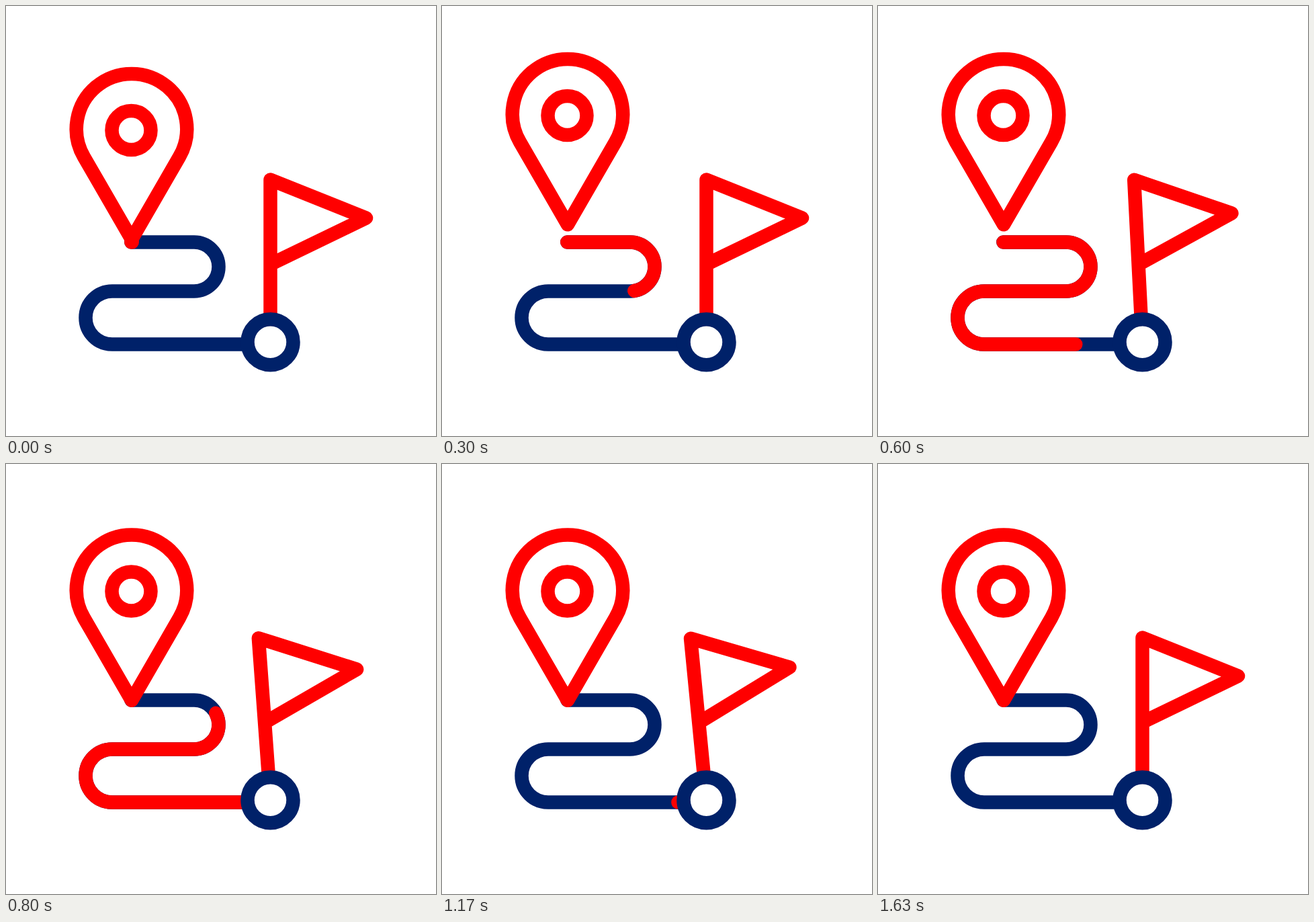
Animation, 640 px wide and 640 px high, one loop 1.67 s. Source, as an HTML page:

```html
<!DOCTYPE html>
<html lang="en">
<head>
<meta charset="utf-8">
<title>Route</title>
<style>
  html, body { margin: 0; width: 100%; height: 100%; overflow: hidden; background: #fff; }
  svg { display: block; width: 100%; height: 100%; }
  g, path { fill: none; stroke-width: 20.5; stroke-linecap: round; stroke-linejoin: round; }
  .red { stroke: #f00; }
  .blue { stroke: #002169; }
</style>
</head>
<body>
<svg viewBox="0 0 640 640">
  <path id="route" class="blue" d="M186.3 351.5H280A36.5 36.5 0 0 1 280 424.5H158A39.5 39.5 0 0 0 158 503.5H357"/>
  <path id="trail" class="red"/>
  <g id="pin" class="red">
    <path d="M187 351.8L116 229A82.2 82.2 0 1 1 258 229Z"/>
    <circle cx="186.5" cy="189.5" r="29"/>
  </g>
  <path id="flag" class="red" d="M393.5 466V258.5L536 315.5L393.5 384.5"/>
  <circle cx="393.5" cy="500.3" r="34" fill="none" stroke-width="20.5" class="blue"/>
</svg>
<script>
  const [route, trail, pin, flag] = ["route", "trail", "pin", "flag"].map(id => document.getElementById(id));
  const LOOP = 1670, STEP = 100 / 3, STEPS = 50;

  // Keys are [step, value].
  const PIN_Y = [[0, 0], [4.8, -63.5], [14.4, 0], [16.3, -32], [25, 0]];
  const FLAG_ANGLE = [[16.2, 0], [22.7, -8], [29.8, 12], [36.9, -6], [43.5, 3], [50, 0]];
  const HEAD = [[0, 0], [25, 1]];
  const TAIL = [[18.75, 0], [37.5, 1]];

  // Closed form of cubic-bezier(.5, 0, .5, 1)
  function ease(x) {
    const s = 0.5 + Math.sinh(Math.asinh(4 * x - 2) / 3);
    return s * s * (3 - 2 * s);
  }

  function valueAt(keys, step) {
    if (step <= keys[0][0]) return keys[0][1];
    const next = keys.findIndex(key => key[0] > step);
    if (next < 0) return keys[keys.length - 1][1];
    const [from, a] = keys[next - 1], [to, b] = keys[next];
    return a + (b - a) * ease((step - from) / (to - from));
  }

  const length = route.getTotalLength();
  trail.setAttribute("d", route.getAttribute("d"));

  function draw(now) {
    const step = Math.min(STEPS, Math.floor((now % LOOP + 5) / STEP) + 1);
    const head = valueAt(HEAD, step) * length;
    const tail = valueAt(TAIL, step) * length;
    trail.style.visibility = head > tail ? "visible" : "hidden";
    trail.setAttribute("stroke-dasharray", `${head - tail} ${2 * length}`);
    trail.setAttribute("stroke-dashoffset", -tail);
    pin.setAttribute("transform", `translate(0 ${valueAt(PIN_Y, step)})`);
    flag.setAttribute("transform", `rotate(${valueAt(FLAG_ANGLE, step)} 393.5 500.3)`);
  }

  const start = performance.now();
  function tick() {
    draw(performance.now() - start);
    requestAnimationFrame(tick);
  }
  tick();
</script>
</body>
</html>
```
